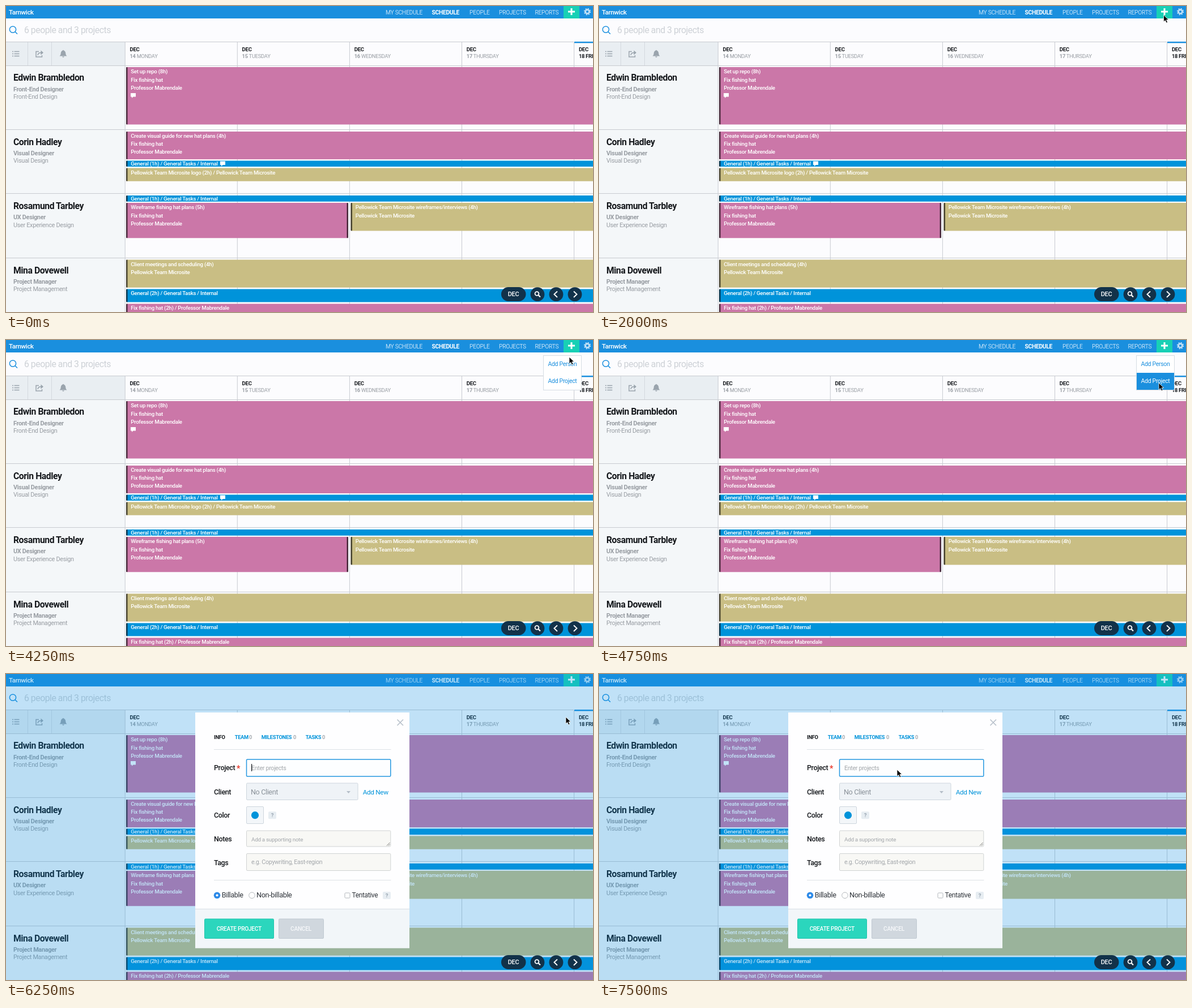
Animation of 1036 by 541 pixels, one loop 8 s. Source, as an HTML page:

```html
<!DOCTYPE html>
<html lang="en">
<head>
<meta charset="utf-8">
<title>Team schedule</title>
<style>
html, body { margin: 0; width: 100%; height: 100%; overflow: hidden; background: #fcfcfe; }
svg { display: block; width: 100%; height: 100%; }
text { font-family: Roboto, Inter, sans-serif; letter-spacing: -.03em; white-space: pre; }
</style>
</head>
<body>
<svg id="stage" viewBox="0 0 1036 541" xmlns="http://www.w3.org/2000/svg"></svg>
<script>
const BLUE = '#1a8fde', BAR = '#0093da', PINK = '#cb77a8', TAN = '#c9be84';
const INK = '#15181c', GREY = '#989da3', LINE = '#c8cbd0';

const rect = (x, y, w, h, fill, more = '') =>
  `<rect x="${x}" y="${y}" width="${w}" height="${h}" fill="${fill}" ${more}/>`;
const text = (x, y, str, size, fill, weight = 400, more = '') =>
  `<text x="${x}" y="${y}" font-size="${size}" fill="${fill}" font-weight="${weight}" ${more}>${str}</text>`;
const mid = (x, y, str, size, fill, weight) =>
  text(x, y, str, size, fill, weight, 'text-anchor="middle"');
const path = (d, stroke, width = 1, more = '') =>
  `<path d="${d}" fill="none" stroke="${stroke}" stroke-width="${width}" ${more}/>`;
const shape = (d, fill) => `<path d="${d}" fill="${fill}"/>`;
const circle = (x, y, r, fill, more = '') =>
  `<circle cx="${x}" cy="${y}" r="${r}" fill="${fill}" ${more}/>`;
const group = (id, body) => `<g id="${id}">${body}</g>`;

function topBar() {
  const nav = [[670, 'MY SCHEDULE'], [751.5, 'SCHEDULE'], [818, 'PEOPLE'], [870, 'PROJECTS'], [933.5, 'REPORTS']];
  return rect(0, 0, 1036, 22, BLUE) +
    text(5, 15, 'Tarnwick', 11.6, '#fff', 500) +
    nav.map(([x, s], i) => text(x, 15, s, 10.3, i === 1 ? '#fff' : '#c3e1f7', i === 1 ? 700 : 400)).join('') +
    rect(984, 0, 28, 22, '#18d0b5') +
    path('M992 10H1004M998 4V16', '#fff', 3) +
    circle(1026, 10, 3.4, 'none', 'stroke="#c3e1f7" stroke-width="2.6"') +
    circle(1026, 10, 5.3, 'none', 'stroke="#c3e1f7" stroke-width="1.8" stroke-dasharray="2.1 2.06"');
}

function searchBar() {
  return circle(12, 41.5, 5.6, 'none', `stroke="${BLUE}" stroke-width="1.5"`) +
    path('M16 45.5L20 49.5', BLUE, 1.6) +
    text(32, 48, '6 people and 3 projects', 15.8, '#cdd1d6');
}

function header() {
  const days = ['14 MONDAY', '15 TUESDAY', '16 WEDNESDAY', '17 THURSDAY', '18 FRIDAY'];
  let out = rect(0, 64, 210, 41, '#e9eef2') + path('M38.5 64V105M80.5 64V105', '#d3d9df');
  for (const y of [80.5, 84.5, 88.5]) out += path(`M11 ${y}H13M14.5 ${y}H23.5`, '#9aa4ad', 1.6);
  out += path('M58 80.5H53V90H63.5V87M56 87C56.5 83.5 59 82.5 62 82.5', '#9aa4ad', 1.5) +
    shape('M61.5 78.5L66 82.5L61.5 86.5Z', '#9aa4ad') +
    shape('M94.5 88.5C97 86.5 96.5 84 97 82C97.5 80 99 79 100 78.7Q101 77 102 78.7C103 79 104.5 80 105 82C105.5 84 105 86.5 107.5 88.5ZM99 89.3H103Q101 92.5 99 89.3Z', '#9aa4ad');
  days.forEach((day, i) => {
    const x = 218.5 + i * 198.1, today = i === 4;
    const [num, name] = day.split(' ');
    out += text(x, 79.7, 'DEC', 9.6, INK, 700) +
      text(x, 91.5, `<tspan font-weight="700">${num}</tspan> ${name}`, 9.35, today ? INK : GREY, today ? 700 : 400);
  });
  return out + rect(1003, 63, 33, 2.5, BLUE);
}

function people() {
  return [
    ['Edwin Brambledon', 'Front-End Designer', 'Front-End Design'],
    ['Corin Hadley', 'Visual Designer', 'Visual Design'],
    ['Rosamund Tarbley', 'UX Designer', 'User Experience Design'],
    ['Mina Dovewell', 'Project Manager', 'Project Management']
  ].map(([name, role, team], i) => {
    const y = i * 113.4;
    return text(13, 132.3 + y, name, 15.8, INK, 700) +
      text(13, 150.5 + y, role, 10.9, GREY, 700) +
      text(13, 163.8 + y, team, 10.9, GREY);
  }).join('');
}

// A task bar with a dark left edge and lines of text from the first baseline down.
function task(x, y, w, h, fill, base, lines) {
  return rect(x, y, w, h, fill, 'rx="2"') +
    rect(x, y, 2.5, h, '#000', 'rx="1" opacity=".65"') +
    lines.map((s, i) => text(x + 8.3, base + i * 14.3, s, 9.7, '#fff', 500)).join('');
}

const bubble = (x, y) => shape(`M${x} ${y}h9v6.5h-4.5l-2.5 2.3v-2.3h-2z`, '#fff');

function tasks() {
  const hat = 'Fix fishing hat', boss = 'Professor Mabrendale', site = 'Pellowick Team Microsite';
  const general = h => `General (${h}h) / General Tasks / Internal`;
  return task(212, 108, 830, 101.5, PINK, 119.3, ['Set up repo (8h)', hat, boss]) + bubble(220, 154) +
    task(212, 222, 830, 49, PINK, 232.8, ['Create visual guide for new hat plans (4h)', hat, boss]) +
    task(212, 273.5, 830, 10.5, BAR, 282, [general(1)]) + bubble(378, 274.6) +
    task(212, 286.5, 830, 23.3, TAN, 297.8, [`${site} logo (2h) / ${site}`]) +
    task(212, 335, 830, 10.7, BAR, 343.7, [general(1)]) +
    task(212, 348, 392, 62.3, PINK, 359.2, ['Wireframe fishing hat plans (5h)', hat, boss]) +
    rect(601.5, 348, 2.5, 62.3, '#000', 'rx="1" opacity=".65"') +
    task(608.5, 348, 440, 49.5, TAN, 359.2, [`${site} wireframes/interviews (4h)`, site]) +
    task(212, 448.5, 830, 49.2, TAN, 459.5, ['Client meetings and scheduling (4h)', site]) +
    task(212, 500.5, 830, 23, BAR, 511.3, [general(2)]) +
    task(212, 526.5, 830, 23, PINK, 537.3, [`${hat} (2h) / ${boss}`]);
}

function board() {
  let grid = '';
  for (let i = 0; i < 5; i++) grid += `M${210.2 + i * 198.1} 64V541`;
  return rect(0, 0, 1036, 541, '#fcfcfe') + rect(0, 105, 210, 436, '#f4f7f9') +
    topBar() + searchBar() + header() +
    path(grid + 'M0 63.5H1002M0 105.5H1036M0 218.5H1036M0 331.5H1036M0 445.5H1036', LINE) +
    people() + tasks();
}

function pager() {
  const dark = '#12324a';
  return rect(874, 497, 43.5, 25, dark, 'rx="12.5"') + mid(895.5, 513.4, 'DEC', 11, '#fff', 500) +
    [938, 971, 1004].map(x => circle(x, 509.7, 12.4, dark)).join('') +
    circle(937, 508.5, 3.4, 'none', 'stroke="#fff" stroke-width="1.8"') +
    path('M939.5 511L943 514.5', '#fff', 2.2) +
    path('M973 504.5L967.5 509.7L973 515M1002 504.5L1007.5 509.7L1002 515', '#fff', 1.9);
}

function dialog() {
  const box = (x, y, w, h, fill, stroke, width = 1) =>
    rect(x, y, w, h, fill, `rx="1.5" stroke="${stroke}" stroke-width="${width}"`);
  const hint = (x, y) => rect(x - 7, y - 6.5, 14, 13, '#e7edf2', 'rx="2"') + mid(x, y + 3.5, '?', 9.5, '#9aa6b2', 700);
  const tabs = [[367, 'INFO'], [403.7, 'TEAM', 429], [450.7, 'MILESTONES', 507], [528.7, 'TASKS', 558]];
  const labels = [['Project', 170.3], ['Client', 212.8], ['Color', 254], ['Notes', 295.8], ['Tags', 337.5]];
  const soft = '#a3a7ab';
  return rect(334, 68, 378, 416.5, '#fefeff') + rect(334, 415.5, 378, 69, '#f2f6f9') +
    path('M334 415.5H712', '#d9dfe5') +
    path('M367 133.5H679.5M367 364.5H679.5', '#dde1e6') +
    path('M690.5 80.5L701 91M701 80.5L690.5 91', '#b8c1cb', 1.7) +
    tabs.map(([x, s, n]) => text(x, 115.4, s, 9.3, n ? BAR : INK, 700) +
      (n ? text(n, 115.4, '0', 9.3, GREY, 500) : '')).join('') +
    labels.map(([s, y]) => text(367, y, s, 12.5, INK, 500)).join('') +
    text(407, 172, '*', 14, '#e8392c', 700) +
    box(424.5, 151, 254.3, 30, '#fdfeff', '#2497e0', 1.5) +
    text(433, 169.6, 'Enter projects', 10.7, soft) +
    rect(433, 159, 1.2, 13, INK, 'id="caret"') +
    box(424.5, 193, 196.5, 29.5, '#eff3f7', '#cdd5dd') +
    text(432, 213.4, 'No Client', 12.6, '#8b929a') + shape('M601 207H608L604.5 211Z', '#b4bdc7') +
    text(629.7, 212.8, 'Add New', 11.8, BAR) +
    box(424.5, 234.5, 30, 30, '#f3f6f9', '#cdd5dd') + circle(439.5, 249.7, 6.6, BAR) + hint(470, 249.7) +
    box(424.5, 277, 254.3, 28, '#f8f8f5', '#d0d3d3') + text(433, 295.5, 'Add a supporting note', 9.9, soft) +
    path('M672 303.5L677.5 298M675 303.5L677.5 301', '#777') +
    box(424.5, 317.5, 254.3, 30, '#f8f8f5', '#d0d3d3') + text(433, 335.7, 'e.g. Copywriting, East-region', 10.7, soft) +
    circle(372.5, 391.3, 5.8, '#2d8ae8') + circle(372.5, 391.3, 2, '#fff') +
    text(380.7, 395.2, 'Billable', 12.7, '#30353b') +
    circle(434, 391.3, 5.3, '#fff', 'stroke="#b5b9bd"') + text(442, 395.2, 'Non-billable', 12.7, '#30353b') +
    box(598, 387, 9, 9, '#fff', '#b0b5ba') + text(610.5, 395.2, 'Tentative', 12, '#30353b') + hint(672, 391.5) +
    box(350.5, 433, 122, 34.5, '#2bd6bd', '#22c4ac') + mid(411.3, 454, 'CREATE PROJECT', 10.2, '#fff', 500) +
    box(481.5, 433, 79, 34.5, '#d0d7de', '#c0c9d2') + mid(520.5, 454, 'CANCEL', 10.2, '#f6f8fa', 500);
}

const menuItem = (id, y, label) =>
  group(id, rect(949, y, 66, 30, '#fff') + mid(982, y + 18.4, label, 10.5, BLUE));

const $ = id => document.getElementById(id);
$('stage').innerHTML = board() +
  rect(0, 0, 1036, 541, '#0c8fdf', 'id="veil" opacity=".25"') + pager() + group('dialog', dialog()) +
  group('menu', menuItem('person', 28, 'Add Person') + menuItem('project', 58, 'Add Project') +
    rect(948.5, 27.5, 67, 61, 'none', 'stroke="#d5dce3"')) +
  group('pointer', '<path d="M0 0V12L2.8 9.4L4.8 13.8L7 12.8L5 8.6H8.8Z" stroke="#fff" stroke-width=".8"/>');

// Start time, x and y of each pointer stop.
const stops = [
  [1000, 752, 79], [1250, 893, 38], [1500, 970, 20], [1750, 998, 14], [2000, 996.5, 16], [2250, 997, 15],
  [3000, 984, 11], [3250, 993, 17], [3500, 994, 16], [4250, 994, 30], [4500, 991, 52], [4750, 988, 76],
  [6500, 649, 218], [6750, 526, 169]
];

const show = (id, on) => $(id).setAttribute('visibility', on ? 'visible' : 'hidden');

function hover(id, on) {
  const [back, label] = $(id).children;
  back.setAttribute('fill', on ? BLUE : '#fff');
  label.setAttribute('fill', on ? '#fff' : BLUE);
}

function draw(now) {
  const t = now % 8000, open = t >= 5750;
  const stop = stops.filter(s => s[0] <= t).pop();
  show('pointer', stop);
  if (stop) $('pointer').setAttribute('transform', `translate(${stop[1]} ${stop[2]})`);

  show('menu', t >= 3500 && !open);
  hover('person', t >= 4500 && t < 4750);
  hover('project', t >= 4750);

  show('veil', open);
  show('dialog', open);
  const entering = t < 6000;
  $('dialog').setAttribute('opacity', entering ? .93 : 1);
  $('dialog').setAttribute('transform', entering ? 'translate(523 276) scale(.995) translate(-523 -276)' : '');
  show('caret', open && (t < 6500 || (t >= 7000 && t < 7500)));
  requestAnimationFrame(draw);
}
draw(performance.now());
</script>
</body>
</html>
```
